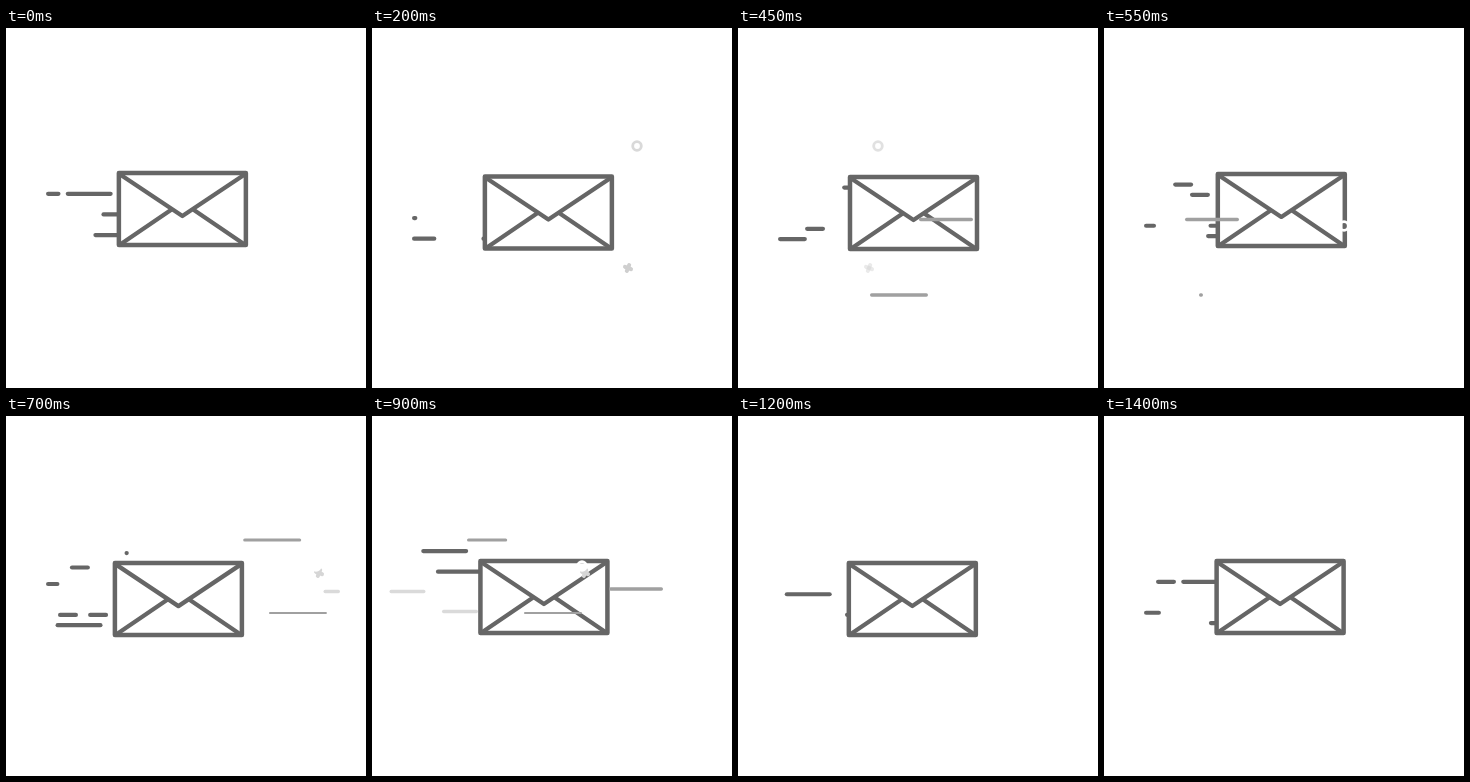
An HTML page with a canvas for the animation above (1450 ms loop, 360 by 360 pixels).

```html
<!DOCTYPE html>
<html lang="en">
<head>
<meta charset="utf-8">
<title>Flying envelope</title>
<style>
html, body { margin: 0; width: 100%; height: 100%; overflow: hidden; background: #fff; }
canvas { display: block; width: 360px; height: 360px; }
</style>
</head>
<body>
<canvas id="stage" width="360" height="360"></canvas>
<script>
const ctx = document.getElementById('stage').getContext('2d');
const LOOP = 1450, STEP = 50;
const INK = '#666';
const WIDTH = 127, HEIGHT = 72;

// Birth times of the dashes shed by the envelope, by lane from top to bottom
const longDashes = { 0: [692], 2: [734], 3: [1272], 4: [985], 7: [164, 493, 1351] };
const shortDashes = { 1.4: [534], 2: [399], 3: [447, 1200], 5: [1374], 6: [293, 500, 586, 1157] };

// Wind passing by; faster gusts are paler and shorter
const gusts = [
  { y: 191.5, birth: 297, speed: 1 },
  { y: 267, birth: 228, speed: .91 },
  { y: 124, birth: 579, speed: .8 },
  { y: 197, birth: 572, speed: .555 },
  { y: 173, birth: 803, speed: 1 },
  { y: 175.5, birth: 689, speed: 1.5 },
  { y: 195.5, birth: 724, speed: 1.5 }
];

const marks = [
  { shape: ring, y: 118, birth: 50, color: '#d9d9d9' },
  { shape: cross, y: 240, birth: 32, color: '#cfcfcf' },
  { shape: cross, y: 157, birth: 646, color: '#d6d6d6' },
  { shape: ring, y: 198, birth: 350, color: '#fff' },
  { shape: ring, y: 150, birth: 640, color: '#fff' }
];

const ageOf = (t, birth) => (t - birth + LOOP) % LOOP;
const wave = (t, peak, cycles) => Math.cos(2 * Math.PI * cycles * (t - peak) / LOOP);
const pulse = (t, peak, width) => Math.exp(-(((t - peak) / width) ** 2));

// Slow sway and light bobbing, with one dip and one nudge forward
function envelopeAt(t) {
  return {
    x: 110.7 + 2.4 * wave(t, 100, 1) + 4 * pulse(t, 550, 90),
    y: 146 + 1.1 * wave(t, 700, 3) + 9.4 * pulse(t, 350, 110)
  };
}

function path(points, color, width) {
  ctx.strokeStyle = color;
  ctx.lineWidth = width;
  ctx.beginPath();
  points.forEach(([x, y]) => ctx.lineTo(x, y));
  ctx.stroke();
}

// Grows out of its start, travels left, then shrinks into its end.
function streak({ y, age, start, end, length, speed, color, width }) {
  const front = start - speed * age;
  const head = Math.max(front, end), tail = Math.min(front + length, start);
  if (tail <= head) return;
  const inset = Math.min(width, tail - head) / 2;
  path([[head + inset, y], [Math.max(head + inset + .1, tail - inset), y]], color, width);
}

function ring(x, y, color) {
  ctx.strokeStyle = color;
  ctx.lineWidth = 2.8;
  ctx.beginPath();
  ctx.arc(x, y, 4.3, 0, Math.PI * 2);
  ctx.stroke();
}

function cross(x, y, color) {
  path([[x - 3, y - 1.2], [x + 3, y + 1.2]], color, 4);
  path([[x + 1.2, y - 3], [x - 1.2, y + 3]], color, 4);
}

function drawDashes(t, top, lanes, length) {
  for (const [lane, births] of Object.entries(lanes)) {
    const y = top - 10 + 10.3 * lane;
    for (const birth of births) {
      streak({ y, age: ageOf(t, birth), start: 122, end: 40, length, speed: .35, color: INK, width: 4.2 });
    }
  }
}

function drawEnvelope({ x, y }) {
  const middle = WIDTH / 2;
  ctx.save();
  ctx.translate(x, y);
  ctx.fillStyle = '#fff';
  ctx.fillRect(0, 0, WIDTH, HEIGHT);
  ctx.strokeStyle = INK;
  ctx.lineWidth = 4.5;
  ctx.strokeRect(0, 0, WIDTH, HEIGHT);
  path([[2, 2], [middle, 43], [WIDTH - 2, 2]], INK, 4.3);
  for (const side of [-1, 1]) {
    path([[middle + side * 61.5, 71], [middle + side * 11.5, 37]], INK, 4.2);
  }
  ctx.restore();
}

function drawGust(t, { y, birth, speed }) {
  streak({
    y, speed, age: ageOf(t, birth),
    start: 334, end: speed < 1 ? 95 : 11,
    length: Math.min(58, 54 / speed),
    color: speed > 1 ? '#dadada' : '#a0a0a0',
    width: Math.min(3.3, 3.8 * speed)
  });
}

function drawMark(t, { shape, y, birth, color }) {
  const age = ageOf(t, birth), life = 440;
  if (age > life) return;
  ctx.globalAlpha = Math.min(1, age / 50, (life - age) / 50);
  shape(340 - age / 2, y, color);
  ctx.globalAlpha = 1;
}

function draw(t) {
  ctx.fillStyle = '#fff';
  ctx.fillRect(0, 0, 360, 360);
  ctx.lineCap = ctx.lineJoin = 'round';
  const envelope = envelopeAt(t);
  drawDashes(t, envelope.y, longDashes, 47);
  drawDashes(t, envelope.y, shortDashes, 20);
  drawEnvelope(envelope);
  gusts.forEach(gust => drawGust(t, gust));
  marks.forEach(mark => drawMark(t, mark));
}

function tick() {
  draw(Math.floor(performance.now() % LOOP / STEP) * STEP);
  requestAnimationFrame(tick);
}
tick();
</script>
</body>
</html>
```
